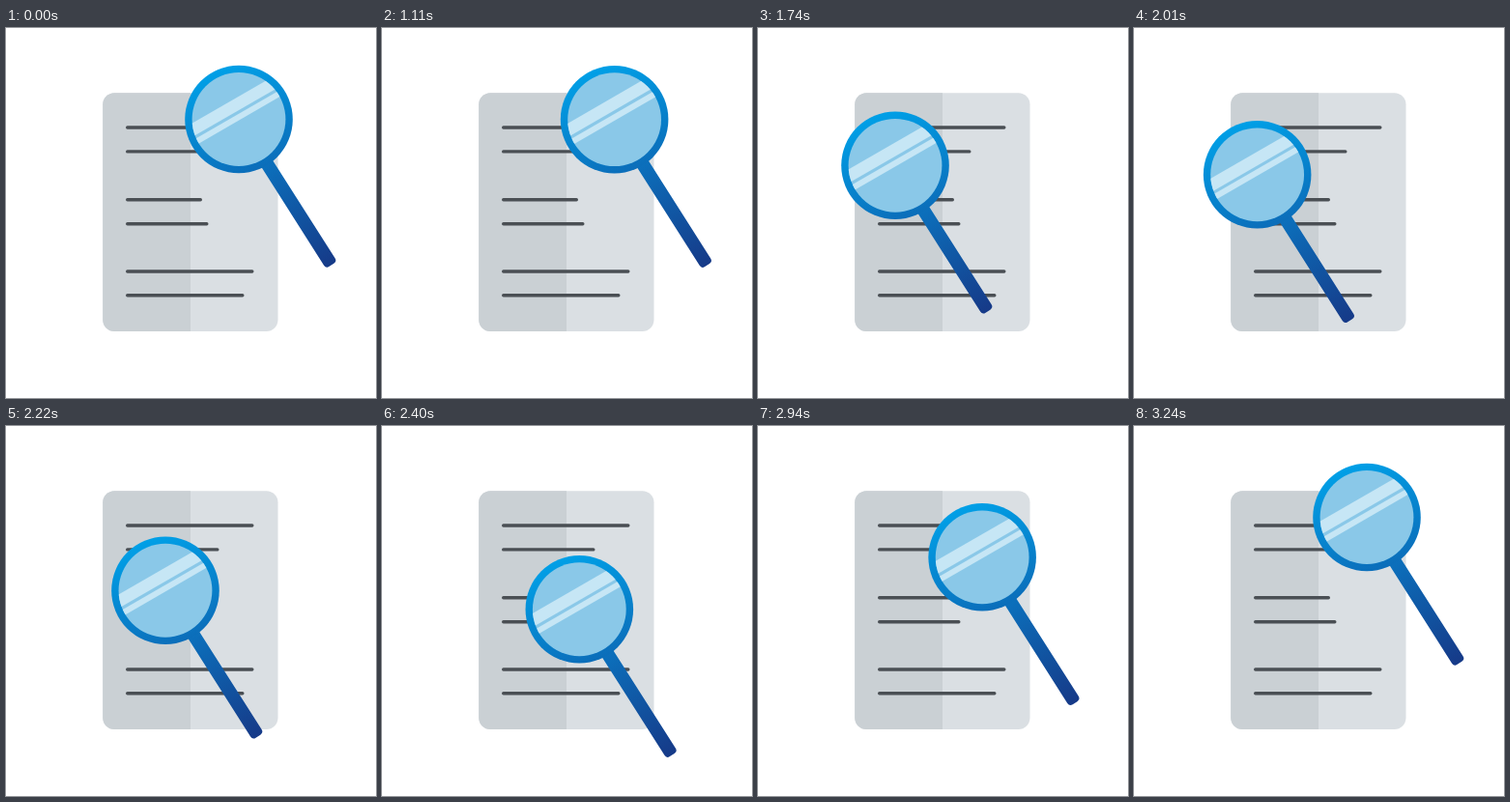
These frames come from a looping animation (383x383 px, 5.31 s). An HTML page with a canvas:

```html
<!DOCTYPE html>
<html lang="en">
<head>
<meta charset="utf-8">
<title>Document search</title>
<style>
  html, body { margin: 0; width: 100%; height: 100%; overflow: hidden; background: #fff; }
  canvas { display: block; width: 100vmin; height: 100vmin; }
</style>
</head>
<body>
<canvas id="stage"></canvas>
<script>
const SIZE = 383, LOOP = 5310, STEP = 30;
const canvas = document.getElementById('stage');
const ctx = canvas.getContext('2d');
const scale = window.devicePixelRatio || 1;
canvas.width = canvas.height = Math.round(SIZE * scale);

// Offsets of the magnifier from its resting place: [time, x, y]
const path = [
  [1080, 0, 0],
  [1950, -116, 56],
  [2550, -22, 102.5],
  [3240, 0, 0]
];
const lines = [[103, 256.5], [127.9, 220.5], [177.7, 203], [202.8, 209.5], [252, 256.5], [276.8, 246.5]];
const lens = { x: 241, y: 94.5, outer: 55.8, inner: 48.4 };

const ease = u => u * u * (3 - 2 * u);

function offsetAt(t) {
  for (let i = 1; i < path.length; i++) {
    const [t0, x0, y0] = path[i - 1], [t1, x1, y1] = path[i];
    if (t >= t0 && t < t1) {
      const k = ease((t - t0) / (t1 - t0));
      return [x0 + (x1 - x0) * k, y0 + (y1 - y0) * k];
    }
  }
  return [0, 0];
}

function gradient(x0, y0, x1, y1, stops) {
  const g = ctx.createLinearGradient(x0, y0, x1, y1);
  stops.forEach(([at, color]) => g.addColorStop(at, color));
  return g;
}

function roundRect(x, y, w, h, r) {
  ctx.beginPath();
  ctx.roundRect(x, y, w, h, r);
}

function disc(r, fill) {
  ctx.beginPath();
  ctx.arc(lens.x, lens.y, r, 0, Math.PI * 2);
  ctx.fillStyle = fill;
  ctx.fill();
}

function drawPage() {
  roundRect(100.2, 67.2, 181.3, 246.9, 12);
  ctx.fillStyle = '#dadfe3';
  ctx.fill();
  roundRect(100.2, 67.2, 90.8, 246.9, [12, 0, 0, 12]);
  ctx.fillStyle = '#cad0d4';
  ctx.fill();

  ctx.strokeStyle = '#4a4f54';
  ctx.lineWidth = 3.4;
  ctx.lineCap = 'round';
  for (const [y, end] of lines) {
    ctx.beginPath();
    ctx.moveTo(125.7, y);
    ctx.lineTo(end - 1.7, y);
    ctx.stroke();
  }
}

function drawMagnifier() {
  const blue = [[0, '#00a0e7'], [0.48, '#0b6fbb'], [1, '#163a88']];

  ctx.save();
  ctx.translate(lens.x, lens.y);
  ctx.rotate(Math.atan2(0.844, 0.537));
  roundRect(50, -6.8, 128.8, 13.6, 4);
  ctx.fillStyle = gradient(0, 0, 178, 0, [[0.28, '#0b72be'], [1, '#163a88']]);
  ctx.fill();
  ctx.restore();

  disc(lens.outer, gradient(225, 40, 310, 250, blue));
  disc(lens.inner, '#8ac8e8');

  // Two slanted reflections cut off by the glass edge
  ctx.save();
  ctx.clip();
  ctx.translate(lens.x, lens.y);
  ctx.rotate(-Math.PI / 6);
  ctx.fillStyle = '#c6e6f5';
  ctx.fillRect(-60, -20.6, 120, 12.4);
  ctx.fillRect(-60, -5, 120, 6);
  ctx.restore();
}

function draw(t) {
  ctx.setTransform(canvas.width / SIZE, 0, 0, canvas.height / SIZE, 0, 0);
  ctx.fillStyle = '#fff';
  ctx.fillRect(0, 0, SIZE, SIZE);
  drawPage();
  ctx.translate(...offsetAt(t));
  drawMagnifier();
}

const start = performance.now();

function tick() {
  const t = (performance.now() - start) % LOOP;
  draw(Math.floor((t + 2) / STEP) * STEP);
  requestAnimationFrame(tick);
}
tick();
</script>
</body>
</html>
```
